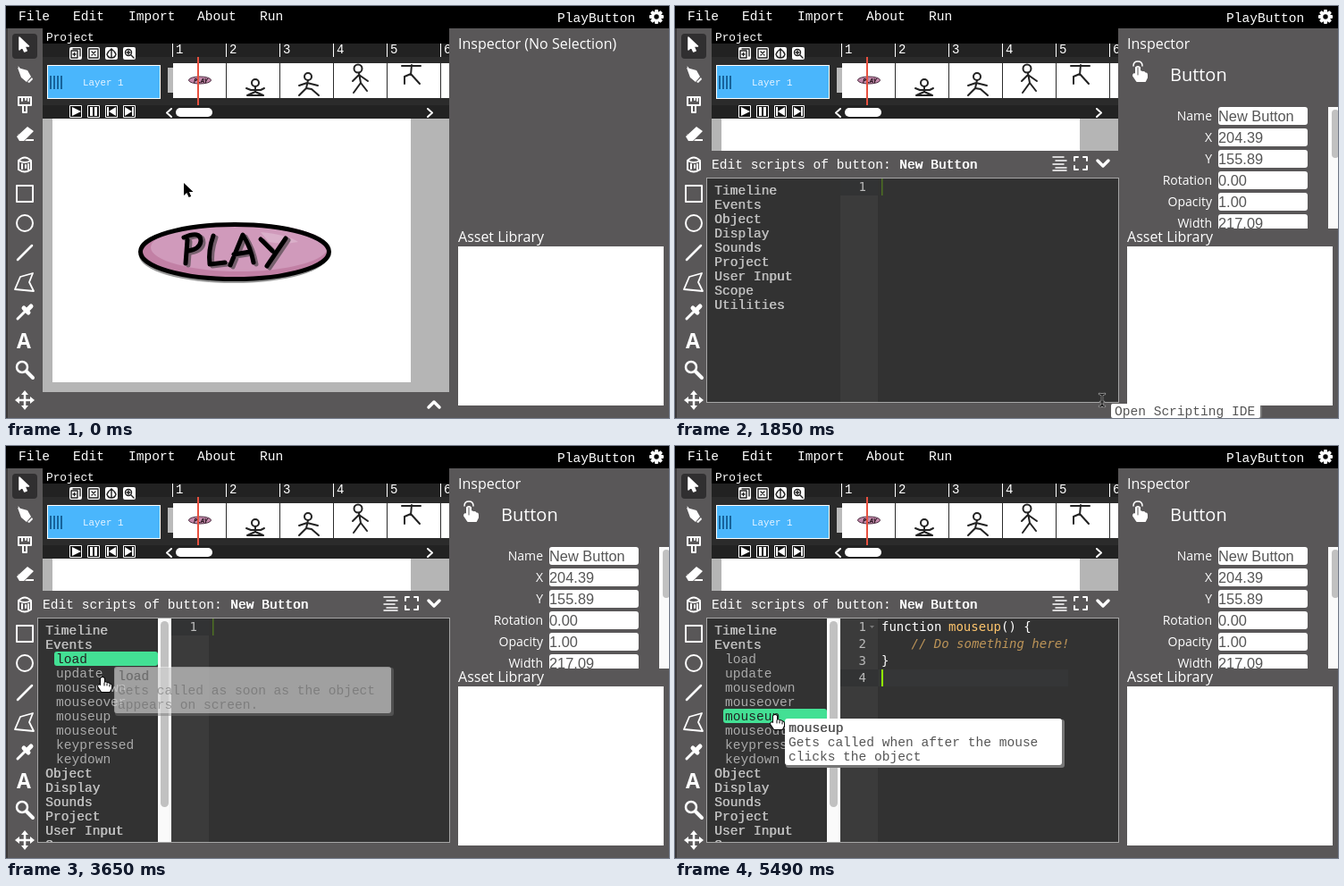
Animation of 742 by 461 pixels, one loop 5.85 s. Source, as an HTML page with a canvas:

```html
<!DOCTYPE html>
<html lang="en">
<head>
<meta charset="utf-8">
<title>Button script editor</title>
<style>
  html, body { margin: 0; width: 100%; height: 100%; overflow: hidden; background: #595758; }
  canvas { display: block; }
</style>
</head>
<body>
<canvas id="stage" width="742" height="461"></canvas>
<script>
const ctx = document.getElementById('stage').getContext('2d');
const LOOP = 5850;
const MONO = '"Liberation Mono", monospace';
const CODE = '"DejaVu Sans Mono", monospace';
const SANS = '"Open Sans", sans-serif';
const INPUT = '"Liberation Sans", sans-serif';
const PANEL = '#595758', GREEN = '#43e094';

// Times of the hard changes
const SELECT = 700, HINT = 1440, OPEN = 1850, HINT_END = 1970, EXPAND = 3010,
      SCROLLBAR = 3060, TIP = 3590, INSERT = 4480, CARET_OFF = 5080, CARET_ON = 5490;

// Pointer runs: start, end, number of ticks between, path as [tick, x, y]
const RUNS = [
  [60, 520, 8, [[-1, 198, 197], [8, 281, 261]]],
  [870, 1440, 10, [[-1, 281, 261], [3, 404, 373], [7, 465, 432], [10, 478, 441]]],
  [1970, 2590, 11, [[-1, 478, 441], [8, 210, 240], [9, 159, 230], [11, 122, 220]]],
  [3420, 4000, 10, [[-1, 122, 220], [3, 110, 243], [4, 108, 259], [7, 108, 290], [10, 112, 301]]],
];

const SECTIONS = ['Timeline', 'Events', 'Object', 'Display', 'Sounds', 'Project',
                  'User Input', 'Scope', 'Utilities'];
const EVENTS = ['load', 'update', 'mousedown', 'mouseover', 'mouseup', 'mouseout',
                'keypressed', 'keydown'];
const HELP = {
  load: ['Gets called as soon as the object', 'appears on screen.'],
  update: ['Gets called over and over while the', 'object is on screen.'],
  mousedown: ['Gets called when the mouse is', 'pressed on the object.'],
  mouseover: ['Gets called when the mouse is over', 'the object.'],
  mouseup: ['Gets called when after the mouse', 'clicks the object'],
};

function rect(x, y, w, h, color, radius = 0) {
  ctx.fillStyle = color;
  ctx.beginPath();
  ctx.roundRect(x, y, w, h, radius);
  ctx.fill();
}

function text(s, x, y, color = '#fff', size = 14.55, font = MONO, style = '') {
  ctx.font = `${style} ${size}px ${font}`;
  ctx.fillStyle = color;
  ctx.fillText(s, x, y);
}

function heavyText(s, x, y, color) {
  text(s, x, y, color);
  text(s, x + 0.6, y, color);
}

function rightText(s, x, y, ...look) {
  ctx.textAlign = 'right';
  text(s, x, y, ...look);
  ctx.textAlign = 'left';
}

// Draws path data moved to (x, y)
function shape(d, { x = 0, y = 0, fill, stroke, width = 2 }) {
  const path = new Path2D(d);
  ctx.save();
  ctx.translate(x, y);
  ctx.lineCap = ctx.lineJoin = 'round';
  ctx.lineWidth = width;
  if (stroke) { ctx.strokeStyle = stroke; ctx.stroke(path); }
  if (fill) { ctx.fillStyle = fill; ctx.fill(path); }
  ctx.restore();
}

function oval(x, y, rx, ry, fill, stroke, width = 2) {
  ctx.beginPath();
  ctx.ellipse(x, y, rx, ry, 0, 0, 7);
  if (fill) { ctx.fillStyle = fill; ctx.fill(); }
  if (stroke) { ctx.strokeStyle = stroke; ctx.lineWidth = width; ctx.stroke(); }
}

function clipped(x, y, w, h, draw) {
  ctx.save();
  ctx.beginPath();
  ctx.rect(x, y, w, h);
  ctx.clip();
  draw();
  ctx.restore();
}

const ARROW = 'M0 0V14L3.3 11 5.6 16 8.2 15 6 10H10.5Z';
const HAND = 'M-2 1Q0-1 2 1V6Q4 4.5 5 6.5 7 5.5 8 7.5 10 7 10 9V12L8 16H-1L-5 10Q-5 7-2 9Z';

function drawMenu() {
  rect(0, 0, 742, 25, '#000');
  [['File', 14], ['Edit', 75], ['Import', 137], ['About', 214], ['Run', 284]]
    .forEach(([label, x]) => text(label, x, 16));
  text('PlayButton', 617, 18);
  for (let i = 0; i < 4; i++) {
    ctx.save();
    ctx.translate(728, 12);
    ctx.rotate(i * Math.PI / 4);
    rect(-2, -8, 4, 16, '#fff', 1);
    ctx.restore();
  }
  oval(728, 12, 4.3, 4.3, '#000', '#fff', 3.2);
}

function drawTools() {
  rect(0, 25, 2, 436, '#3a3839');
  rect(7, 31, 28, 28, '#302f30', 4);
  const line = (d, y, width = 2) => shape(d, { x: 21, y, stroke: '#fff', width });
  const solid = (d, y) => shape(d, { x: 21, y, fill: '#fff' });
  shape(ARROW, { x: 15, y: 35, fill: '#fff', stroke: '#fff', width: 1.5 });
  solid('M-8-8L3-5 7 2 2 8-4 3ZM3 8L8 3 9 5 5 9Z', 77);
  line('M-7-9L-3-3', 77, 1);
  line('M-7-8H7V1H-7ZM-3-8V-4M1-8V-5M4-8V-4M-2 2V9H2V2', 110);
  solid('M-9 3L3-8 10-3-1 8H-6ZM2 6H10V8H0Z', 143);
  line('M-7 1L-1 6 3 3', 143, 1);
  line('M-7-3V6Q0 11 7 6V-3M-7-4Q0-11 7-4Q0 0-7-4M-3 0V5M1 1V4M4 0V6', 177);
  line('M-9-9H9V9H-9Z', 210);
  oval(21, 243, 9, 9, null, '#fff');
  line('M-8 8L8-8', 276, 2.5);
  line('M-11 7L-5-7 9-11 5-1 10 9Z', 310, 1.8);
  line('M-8 8L2-2', 342, 3);
  line('M-1-4L4 1M2-1L7-6', 342, 5);
  text('A', 12, 383, '#fff', 23, SANS, 'bold');
  oval(18, 404, 6, 6, null, '#fff', 2.5);
  line('M2 2L9 9', 407, 4);
  line('M-8 0H8M0-8V8', 441, 2.5);
  solid('M0-11L4-6H-4ZM0 11L4 6H-4ZM-11 0L-6-4V4ZM11 0L6-4V4Z', 441);
}

function drawFigures() {
  const figure = d => shape(d, { stroke: '#222', width: 2 });
  oval(279, 86, 4, 4, null, '#222');
  figure('M279 90V96M269 92L274 94H285L289 92M270 100L279 96 288 100Z');
  oval(338, 79, 4, 4, null, '#222');
  figure('M338 83L336 92M328 89L337 86 349 89M328 100L336 92 342 93 350 100');
  oval(394, 70, 4.5, 4.5, null, '#222');
  figure('M395 75L397 86M388 84L395 77 405 84M389 97L397 86 404 95');
  figure('M443 67H464M454 66L453 77M446 87V79L453 76 463 87');
}

function drawTimeline() {
  rect(41, 25, 455, 17, '#000');
  text('Project', 45, 39, '#fff', 12.8);
  rect(41, 42, 455, 84, '#222');
  rect(41, 57, 455, 54, '#2b2b2b');

  for (const x of [71, 91, 111, 131]) {
    rect(x, 46, 14, 14, '#fff', 2);
    rect(x, 111, 14, 14, '#fff', 1);
    rect(x + 1, 112, 12, 12, '#111');
  }
  const dark = d => shape(d, { stroke: '#222', width: 1.4 });
  dark('M73 50H80V58H73ZM75 54H78M76.500 52.500V55.500M75 48H83V56');
  dark('M93 48H103V58H93ZM96 51L100 55M100 51L96 55');
  dark('M118 48Q114 51 113 54 114 58 118 58 122 58 123 54 122 51 118 48M118 48V58');
  oval(137, 52, 3.5, 3.5, null, '#222', 1.4);
  dark('M140 55L143 58M135 52H139M137 50V54');
  shape('M74 113L84 118 74 123ZM94 113H97V123H94ZM99 113H102V123H99ZM113 113H115V123H113Z' +
        'M123 113V123L115 118ZM133 113V123L141 118ZM141 113H143V123H141Z', { fill: '#fff' });

  rect(46, 66, 127, 38, '#fff');
  rect(47, 67, 125, 36, '#4ab6fc');
  for (let x = 49; x < 63; x += 4) rect(x, 78, 2, 15, '#17639b');
  text('Layer 1', 86, 89, '#e8f5ff', 10.8);

  rect(181, 69, 6, 28, '#bbb');
  clipped(181, 42, 315, 69, () => {
    for (let i = 0; i < 6; i++) {
      const x = 186 + i * 60;
      rect(x, 42, 1, 15, '#fff');
      text(i + 1, x + 4, 53, '#fff', 14);
      rect(x + 1, 64, 59, 39, '#fff');
    }
    drawFigures();
  });
  oval(217, 83, 12.5, 4, '#c58aac', '#4b2d40', 1);
  text('PLAY', 210, 86, '#201018', 7, SANS, 'italic bold');
  rect(214, 57, 2, 54, '#e8503f');

  rect(190, 114, 41, 10, '#fff', 5);
  shape('M185 115L180 119.500 185 124M472 115L477 119.500 472 124', { stroke: '#fff' });
}

function drawPlayButton() {
  oval(255, 279, 106, 31, '#999');
  oval(256, 275, 105.5, 30.5, '#c280a5');
  clipped(148, 240, 220, 70, () => oval(261, 270, 99, 27, '#d09abb'));
  shape('M285 253Q315 256 327 264 310 267 294 264Z', { fill: '#dab0ca' });
  oval(256, 275, 105.5, 30.5, null, '#000', 5);
  const letters = 'M203 262L201 288M199 259Q218 251 218 263 217 272 204 274' +
                  'M232 257Q226 274 228 289L245 287M251 290L265 256Q274 270 277 287' +
                  'M255 278L273 275M285 261L298 274M313 260L292 291';
  shape(letters, { x: 3, y: 2, stroke: '#76606d', width: 5 });
  shape(letters, { stroke: '#000', width: 5 });
}

function drawSelection() {
  const color = '#aaaaf2';
  shape('M148 242H365V312H148ZM256.500 242V202', { stroke: '#bcbcf4' });
  for (const x of [148, 256.5, 365])
    for (const y of [242, 277, 312])
      oval(x, y, 5, 5, x === 256.5 && y === 277 ? null : 'rgba(255,255,255,.7)', color);
  oval(256.5, 202, 5, 5, '#fff', color);
}

function drawStage(selected) {
  rect(41, 126, 455, 306, '#b5b5b5');
  rect(52, 126, 401, 295, '#fff');
  drawPlayButton();
  if (selected) drawSelection();
}

function drawInspector(selected) {
  text(selected ? 'Inspector' : 'Inspector (No Selection)', 506, 48, '#fff', 16, SANS);
  if (selected) {
    shape(HAND, { x: 518, y: 68, fill: '#fff', stroke: '#fff', width: 2 });
    shape('M513 67Q513 62 518 62 523 62 523 67', { stroke: '#fff', width: 1.5 });
    shape('M518 69V77', { stroke: PANEL, width: 1 });
    text('Button', 554, 84, '#fff', 20, SANS);
    clipped(496, 105, 246, 144, () => {
      [['Name', 'New Button'], ['X', '204.39'], ['Y', '155.89'], ['Rotation', '0.00'],
       ['Opacity', '1.00'], ['Width', '217.09']].forEach(([label, value], i) => {
        const y = 113 + i * 24;
        rightText(label, 601, y + 15, '#fff', 14, SANS);
        rect(608, y, 100, 20, '#fff', 3);
        text(value, 608, y + 16, '#555', 16.4, INPUT);
      });
    });
    rect(731, 113, 11, 136, '#fafafa');
    rect(735, 116, 8, 54, '#c1c1c1', 4);
  }
  text('Asset Library', 506, 264, '#fff', 16, SANS);
  rect(506, 269, 230, 178, '#fff');
}

function drawScriptBar(y, selected, open) {
  rect(41, y, 455, 30, PANEL);
  if (selected) {
    text('Edit scripts of button:', 41, y + 20);
    heavyText('New Button', 251, y + 20, '#fff');
  }
  shape(open ? 'M-6-3L0 3 6-3' : 'M-6 3L0-3 6 3', { x: 479, y: y + 14, stroke: '#fff', width: 3.5 });
  if (!open) return;
  shape('M423 169H435M426 173H438M423 177H435M426 181H438M423 184H438', { stroke: '#fff', width: 1.5 });
  shape('M447 173V169H451M457 169H461V173M461 179V183H457M451 183H447V179', { stroke: '#fff' });
}

function treeRows(expanded) {
  const heads = SECTIONS.map(name => ({ name }));
  if (expanded) heads.splice(2, 0, ...EVENTS.map(name => ({ name, child: true })));
  return heads;
}

function drawTree(rows, hovered, scrollbar) {
  const right = scrollbar ? 170 : 185;
  rows.forEach((row, i) => {
    const y = 198 + i * 16, on = row === hovered, left = row.child ? 54 : 42;
    if (on) rect(left, y, right - left, 16, GREEN, 3);
    if (row.child) text(row.name, 56, y + 13, on ? '#222' : '#aaa');
    else heavyText(row.name, 44, y + 13, on ? '#a2b8ab' : '#bdbdbd');
  });
  if (scrollbar) {
    rect(170, 193, 15, 250, '#fafafa');
    rect(173, 196, 9, 208, '#c1c1c1', 4.5);
  }
}

function drawCode(t) {
  const filled = t >= INSERT, count = filled ? 4 : 1, active = 193 + (count - 1) * 19;
  const code = (s, x, line, color, style) => text(s, x, 188 + line * 19, color, 14, CODE, style);
  rect(185, 193, 42, 250, '#3b3b3b');
  rect(185, active, 42, 19, '#323334');
  if (filled) rect(227, active, 213, 19, '#353637');
  for (let n = 1; n <= count; n++) rightText(n, 214, 188 + n * 19, '#bbb', 14, CODE);
  if (filled) {
    shape('M218 201H223L220.500 204Z', { fill: '#777' });
    code('function', 231, 1, '#fff');
    code('mouseup', 306, 1, '#ffc66d');
    code('() {', 365, 1, '#fff');
    code('// Do something here!', 264.5, 2, '#bc9458', 'italic');
    code('}', 231, 3, '#fff');
  }
  if (t < CARET_OFF || t >= CARET_ON) rect(231, active, filled ? 2 : 1.5, 19, filled ? '#91ff00' : '#4d7022');
}

function drawEditor(t, rows, hovered) {
  rect(35, 192, 462, 252, '#a5a5a5');
  rect(36, 193, 460, 250, '#323232');
  clipped(36, 193, 460, 250, () => {
    drawCode(t);
    drawTree(rows, hovered, t >= SCROLLBAR);
  });
  rect(35, 444, 461, 17, PANEL);
}

function drawHelp(name, x, y, alpha) {
  ctx.globalAlpha = alpha;
  rect(x + 1, y + 1, 312, 54, '#777', 3);
  rect(x, y, 310, 52, '#fff', 3);
  heavyText(name, x + 4, y + 15, '#555');
  HELP[name].forEach((line, i) => text(line, x + 4, y + 31 + i * 16, '#555'));
  ctx.globalAlpha = 1;
}

function drawHint(alpha) {
  ctx.globalAlpha = alpha;
  rect(490, 447, 167, 14, '#777', 2);
  rect(488, 445, 167, 16, '#fff', 2);
  text('Open Scripting IDE', 492, 458, '#555');
  ctx.globalAlpha = 1;
}

function pointerAt(t) {
  const [start, end, ticks, path] = RUNS.findLast(run => t >= run[0]) || RUNS[0];
  const raw = Math.floor((t - start) / (end - start) * ticks + 0.2);
  const tick = t < start ? -1 : Math.min(raw, ticks);
  const next = Math.max(1, path.findIndex(key => key[0] >= tick));
  const [a, ax, ay] = path[next - 1], [b, bx, by] = path[next];
  const k = (tick - a) / (b - a);
  return { x: Math.round(ax + (bx - ax) * k), y: Math.round(ay + (by - ay) * k) };
}

function drawPointer({ x, y }, open) {
  const overTree = open && x < 185 && y > 192;
  const overBar = !open && y > 432;
  if (overTree || overBar) {
    shape(HAND, { x, y, fill: '#fff', stroke: '#000', width: 1.8 });
    shape('M2 6V9M5 7V9M8 8V10', { x, y, stroke: '#000', width: 1 });
  } else if (open && y > 192) {
    const beam = 'M-3-7Q0-7 0-5V5Q0 7-3 7M3-7Q0-7 0-5M0 5Q0 7 3 7M-2 2H2';
    shape(beam, { x, y, stroke: '#aaa', width: 2.5 });
    shape(beam, { x, y, stroke: '#111', width: 1.2 });
  } else {
    shape(ARROW, { x: x + 1, y: y + 1, fill: '#000', stroke: '#fff', width: 2 });
  }
}

function render(t) {
  const selected = t >= SELECT, open = t >= OPEN, expanded = t >= EXPAND;
  rect(0, 0, 742, 461, PANEL);
  drawMenu();
  drawTools();
  drawTimeline();
  drawStage(selected);
  drawInspector(selected);
  drawScriptBar(open ? 162 : 432, selected, open);

  const pointer = pointerAt(t);
  // Once the list is expanded, hover effects trail the pointer by one tick
  const trail = expanded ? pointerAt(t - 58) : pointer;
  if (open) {
    const rows = treeRows(expanded);
    const hovered = trail.x < 185 ? rows[Math.floor((trail.y - 198) / 16)] : null;
    drawEditor(t, rows, hovered);
    if (t >= TIP && hovered?.child) {
      const alpha = Math.min(1, (Math.floor((t - TIP) / 58) + 1) / 4);
      drawHelp(hovered.name, trail.x + 11, trail.y + 4, t < 3710 ? alpha * 0.9 : alpha);
    }
  }
  if (t >= HINT && t < HINT_END) drawHint(t < 1490 ? 0.5 : 1);
  drawPointer(pointer, open);
}

function loop() {
  render(performance.now() % LOOP);
  requestAnimationFrame(loop);
}
loop();
</script>
</body>
</html>
```
